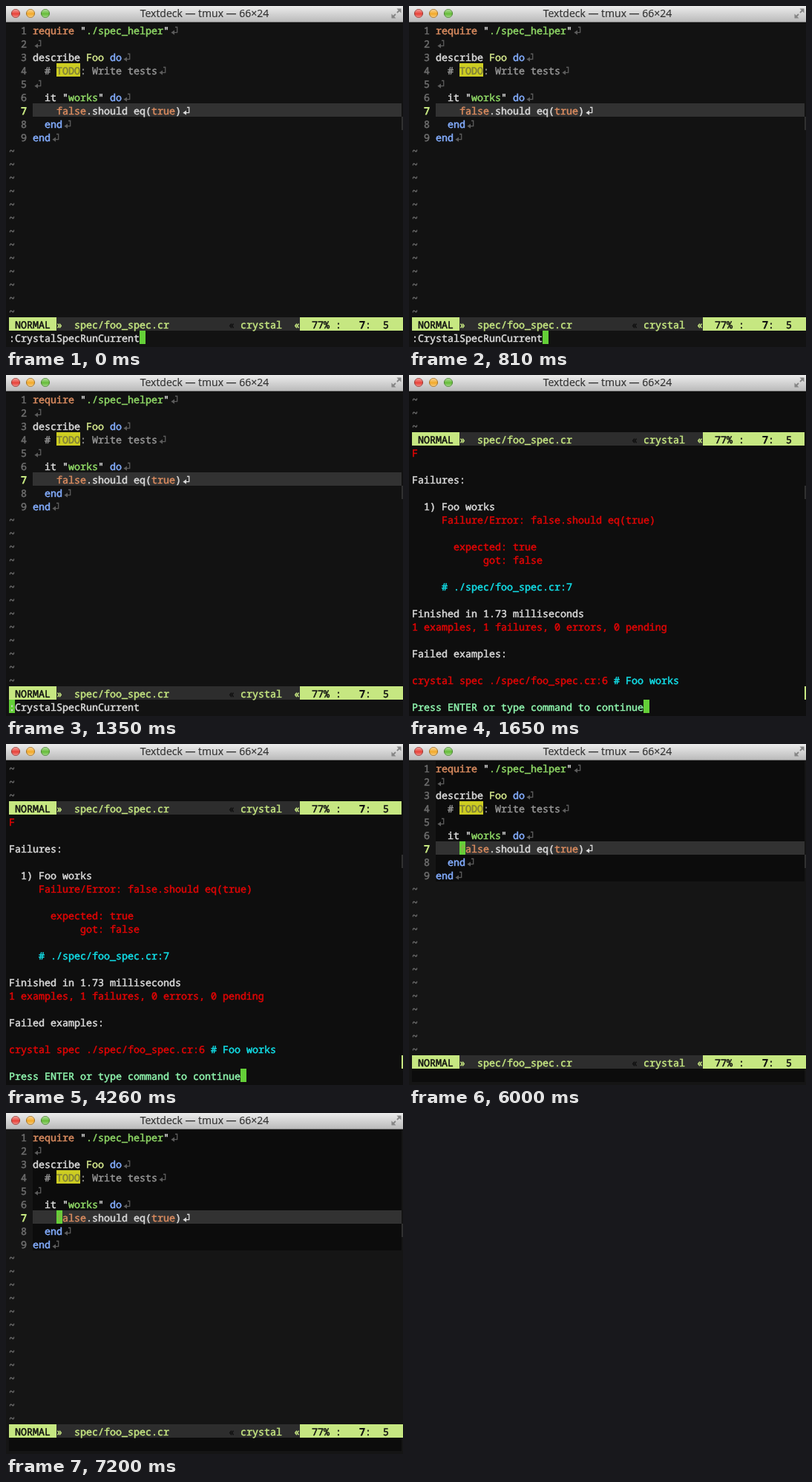
Animation of 535x459 px, one loop 8000 ms. Source, as an HTML page:

```html
<!DOCTYPE html>
<html lang="en">
<head>
<meta charset="utf-8">
<title>Spec run</title>
<style>
  html, body { margin: 0; width: 100%; height: 100%; overflow: hidden; background: #121212; }
  svg { display: block; width: 535px; height: 459px; }
  text { white-space: pre; }
  .cell { font: 13.333px "Noto Sans Mono", "DejaVu Sans Mono", monospace; text-rendering: geometricPrecision; stroke-width: .5px; }
  .bold { stroke-width: .85px; }
  .title { font: 14px "Open Sans", "Noto Sans", sans-serif; stroke: #333; stroke-width: .2px; }
</style>
</head>
<body>
<svg id="stage" viewBox="0 0 535 459">
  <defs>
    <linearGradient id="bar" x2="0" y2="1">
      <stop offset="0" stop-color="#ececec"/>
      <stop offset="1" stop-color="#b9b9b9"/>
    </linearGradient>
    <linearGradient id="shine" x2="0" y2="1">
      <stop offset="0" stop-color="#fff" stop-opacity=".5"/>
      <stop offset=".55" stop-color="#fff" stop-opacity="0"/>
      <stop offset="1" stop-color="#fff" stop-opacity=".4"/>
    </linearGradient>
  </defs>
</svg>
<script>
const NS = "http://www.w3.org/2000/svg";
const stage = document.getElementById("stage");
const CW = 8, LH = 18, LEFT = 4, TOP = 23;
const C = {
  fg: "#dadada", dim: "#6e6e6e", note: "#949494", orange: "#d98b5f", green: "#8fd866",
  type: "#d3e68c", blue: "#84aeff", lime: "#c6e781", cursor: "#64cf38",
  red: "#e00505", cyan: "#12dfe8", mint: "#8ff5ae", ink: "#111111", bar: "#2d2d2d"
};

function el(parent, tag, attrs, body) {
  const node = document.createElementNS(NS, tag);
  for (const key in attrs) node.setAttribute(key, attrs[key]);
  if (body) node.textContent = body;
  parent.appendChild(node);
  return node;
}
const group = parent => el(parent, "g", {});
const rect = (parent, x, y, width, height, fill) => el(parent, "rect", { x, y, width, height, fill });
const colX = col => LEFT + col * CW;
const rowY = row => TOP + (row - 1) * LH;
const block = (parent, row, col, count, fill) => rect(parent, colX(col), rowY(row), count * CW, LH, fill);

function write(parent, row, col, text, fill, bold) {
  el(parent, "text", {
    x: colX(col), y: rowY(row) + 15, fill, stroke: fill, class: bold ? "cell bold" : "cell"
  }, text);
}

// Writes [text, colour] pairs one after another and returns the next column.
function line(parent, row, col, ...runs) {
  for (const [text, fill] of runs) {
    write(parent, row, col, text, fill);
    col += text.length;
  }
  return col;
}

function lineEnd(parent, row, col, color) {
  const g = el(parent, "g", { transform: `translate(${colX(col)} ${rowY(row)})` });
  el(g, "path", { d: "M8 5.5H10.7V12.7H6", fill: "none", stroke: color, "stroke-width": 1.3 });
  el(g, "path", { d: "M7 9.5V15.8L2.4 12.7Z", fill: color });
}

function tildes(parent, from, to) {
  for (let row = from; row <= to; row++) write(parent, row, 0, "~", C.dim);
}

function statusLine(parent, row) {
  rect(parent, LEFT, rowY(row), 529, LH, C.bar);
  block(parent, row, 0, 8, C.lime);
  rect(parent, colX(49), rowY(row), 137, LH, C.lime);
  write(parent, row, 1, "NORMAL", C.ink);
  write(parent, row, 8, "»", C.lime);
  write(parent, row, 11, "spec/foo_spec.cr", C.lime);
  write(parent, row, 37, "«", C.ink);
  write(parent, row, 39, "crystal", C.lime);
  write(parent, row, 48, "«", C.lime);
  write(parent, row, 51, "77% :", C.ink);
  write(parent, row, 59, "7", C.ink, true);
  write(parent, row, 60, ":  5", C.ink);
}

function titleBar() {
  rect(stage, 0, 0, 535, 22, "url(#bar)");
  rect(stage, 0, 21, 535, 1, "#8a8a8a");
  [["#e8443b", "#94302b"], ["#f3ab2c", "#a06c1c"], ["#67bd3a", "#437f2a"]].forEach(([fill, stroke], i) => {
    const spot = { cx: 13 + i * 20, cy: 10, r: 5.5 };
    el(stage, "circle", { ...spot, fill, stroke });
    el(stage, "circle", { ...spot, fill: "url(#shine)" });
  });
  el(stage, "text", { x: 267.5, y: 15, fill: "#333", "text-anchor": "middle", class: "title" },
    "Textdeck — tmux — 66×24");
  el(stage, "path", { d: "M526.5 3.5H532.5V9.5ZM519.5 10.5V16.5H525.5Z", fill: "#858585" });
  el(stage, "path", { d: "M527 9L530 6M522 14L525 11", stroke: "#858585", "stroke-width": 1.8 });
}

function buildEditor(g) {
  rect(g, colX(4), rowY(7), 497, LH, "#323232");
  for (let n = 1; n <= 9; n++) write(g, n, 2, String(n), n === 7 ? C.lime : "#6e6e6e", n === 7);
  block(g, 4, 8, 4, "#cdcd22");
  const rows = [
    [4, ["require ", C.orange], ['"', C.fg], ["./spec_helper", C.green], ['"', C.fg]],
    [4],
    [4, ["describe ", C.fg], ["Foo ", C.type], ["do", C.blue]],
    [6, ["# ", C.note], ["TODO", "#80803a"], [": Write tests", C.note]],
    [4],
    [6, ["it ", C.fg], ['"', C.fg], ["works", C.green], ['" ', C.fg], ["do", C.blue]],
    [8, ["false", C.orange], [".should eq(", C.fg], ["true", C.orange], [")", C.fg]],
    [6, ["end", C.blue]],
    [4, ["end", C.blue]]
  ];
  rows.forEach(([col, ...runs], i) => {
    lineEnd(g, i + 1, line(g, i + 1, col, ...runs), i === 6 ? C.fg : "#5c5c5c");
  });
  tildes(g, 10, 22);
  statusLine(g, 23);
}

function buildReport(g) {
  tildes(g, 1, 3);
  statusLine(g, 4);
  const rows = [
    [5, 0, ["F", C.red]],
    [7, 0, ["Failures:", C.fg]],
    [9, 2, ["1) Foo works", C.fg]],
    [10, 5, ["Failure/Error: false.should eq(true)", C.red]],
    [12, 7, ["expected: true", C.red]],
    [13, 12, ["got: false", C.red]],
    [15, 5, ["# ./spec/foo_spec.cr:7", C.cyan]],
    [17, 0, ["Finished in 1.73 milliseconds", C.fg]],
    [18, 0, ["1 examples, 1 failures, 0 errors, 0 pending", C.red]],
    [20, 0, ["Failed examples:", C.fg]],
    [22, 0, ["crystal spec ./spec/foo_spec.cr:6 ", C.red], ["# Foo works", C.cyan]],
    [24, 0, ["Press ENTER or type command to continue", C.mint]]
  ];
  rows.forEach(row => line(g, ...row));
}

const back = rect(stage, 0, 22, 535, 437, "#121212");
titleBar();
rect(stage, 533, rowY(8), 2, LH, "#303030");
rect(stage, 533, rowY(23), 2, LH, C.lime);

// Darker text area and command row once the editor has been redrawn.
const shade = group(stage);
rect(shade, colX(4), rowY(1), 497, 9 * LH, "#0c0c0c");
rect(shade, LEFT, rowY(24), 529, LH, "#0c0c0c");

const editor = group(stage), report = group(stage);
buildEditor(editor);
buildReport(report);
const cursor = block(stage, 24, 0, 1, C.cursor);
const command = group(stage);
write(command, 24, 0, ":", C.fg);
write(command, 24, 1, "CrystalSpecRunCurrent", C.fg);
const covered = group(stage);
write(covered, 7, 8, "f", "#86b345");

const LOOP = 8000;
const scenes = [
  { from: 0, row: 24, col: 22, back: "#121212", command: true },
  { from: 1350, row: 24, col: 0, back: "#121212", command: true },
  { from: 1650, row: 24, col: 39, back: "#0e0e0e", report: true },
  { from: 6000, row: 7, col: 8, back: "#151515", redrawn: true }
];
const show = (node, on) => node.setAttribute("display", on ? "inline" : "none");

function draw(time) {
  const scene = scenes.filter(s => s.from <= time).pop();
  back.setAttribute("fill", scene.back);
  show(editor, !scene.report);
  show(report, scene.report);
  show(command, scene.command);
  show(shade, scene.redrawn);
  show(covered, scene.redrawn);
  cursor.setAttribute("x", colX(scene.col));
  cursor.setAttribute("y", rowY(scene.row));
}

const start = performance.now();
function tick() {
  draw((performance.now() - start) % LOOP);
  requestAnimationFrame(tick);
}
tick();
</script>
</body>
</html>
```
